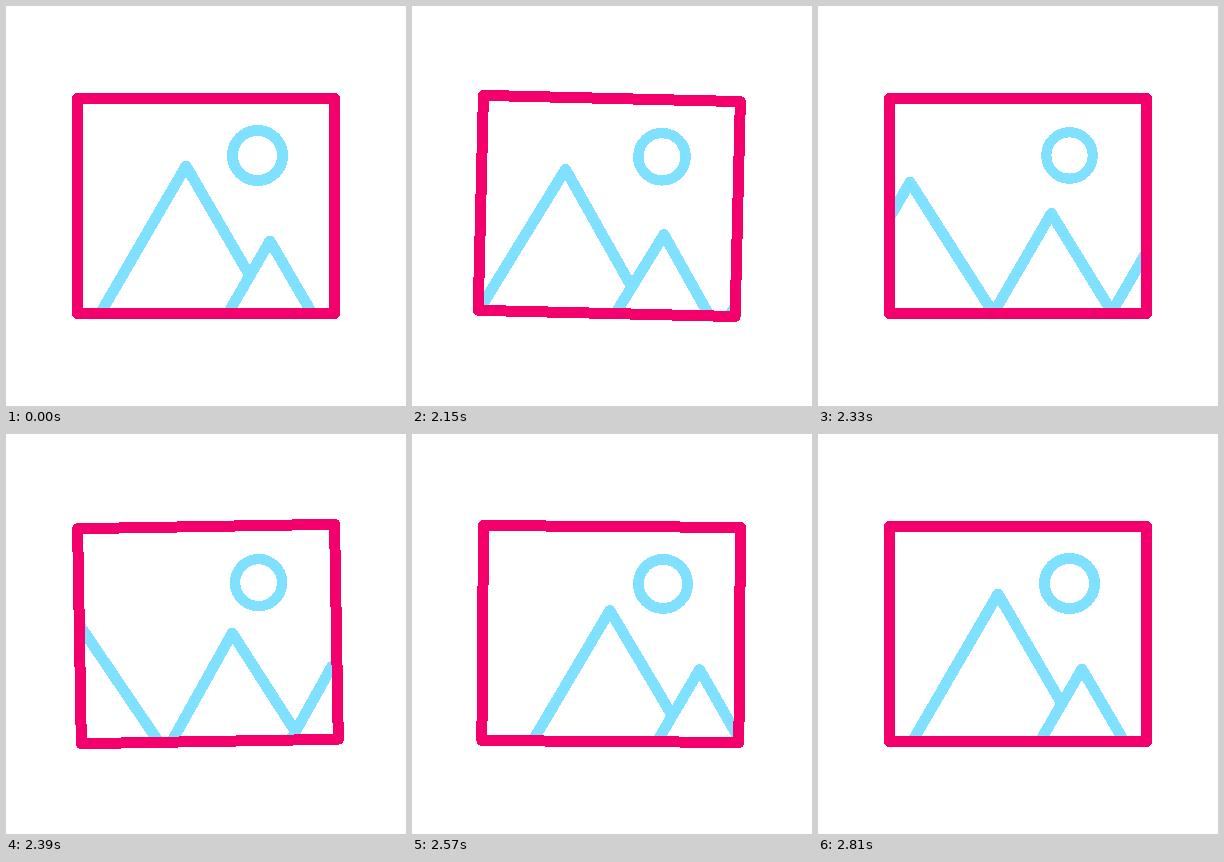
An HTML page for the animation above (2.9 s loop, 400 by 400 pixels).

```html
<!DOCTYPE html>
<html lang="en">
<head>
<meta charset="utf-8">
<title>Swinging picture</title>
<style>
  html, body { margin: 0; width: 100%; height: 100%; overflow: hidden; background: #fff; }
  svg { display: block; width: 100%; height: 100%; }
  svg * {
    fill: none; stroke-width: 11; stroke-linejoin: round;
    shape-rendering: crispEdges;
  }
  .blue { stroke: #80e0ff; }
  .pink { stroke: #f4006c; }
</style>
</head>
<body>
<svg viewBox="0 0 400 400">
  <clipPath id="inside"><rect x="71.5" y="92.5" width="257" height="215"/></clipPath>
  <g id="picture">
    <g clip-path="url(#inside)">
      <path id="peaks" class="blue"/>
      <circle id="sun" class="blue" r="25"/>
    </g>
    <rect class="pink" x="71.5" y="92.5" width="257" height="215"/>
  </g>
</svg>
<script>
const LOOP = 2900, START = 2000, STEP = 30, STEPS = 27;
const BASE = 320, SLOPE = 1.72;
// [step, degrees] of the swing around the top edge
const SWING = [[0, 0], [7.2, 1.8], [13.6, -1.1], [19.3, 0.45], [27, 0]];

const picture = document.getElementById('picture');
const peaks = document.getElementById('peaks');
const sun = document.getElementById('sun');

const mix = (a, b, p) => a + (b - a) * p;
const ease = x => mix((1 - Math.cos(Math.PI * x)) / 2, x, 0.2);

function swingAt(step) {
  const i = Math.max(1, SWING.findIndex(key => key[0] >= step));
  const [s0, a0] = SWING[i - 1], [s1, a1] = SWING[i];
  return mix(a0, a1, ease((step - s0) / (s1 - s0)));
}

// Each peak slides left: large leaves, small grows large, a new small one enters.
function peaksAt(p) {
  return [
    { x: mix(180, -60, p), y: mix(160, 204, p), slope: SLOPE - 0.4 * p },
    { x: mix(264, 180, p), y: mix(235, 160, p), slope: SLOPE - 0.1 * Math.sin(Math.PI * p) },
    { x: mix(376, 264, p), y: 235, slope: SLOPE }
  ];
}

// The right leg stops where it meets the left leg of the next peak.
function legs(peak, i, all) {
  const { x, y, slope } = peak, next = all[i + 1];
  let run = (BASE - y) / slope;
  if (next) run = Math.min(run, (next.y - y + SLOPE * (next.x - x)) / (slope + SLOPE));
  return `M${x - (BASE - y) / SLOPE} ${BASE}L${x} ${y}L${x + run} ${y + slope * run}`;
}

function draw(time) {
  const step = Math.min(STEPS, Math.max(0, Math.floor((time % LOOP - START) / STEP)));
  const t = step / STEPS;
  const pulse = Math.max(0, Math.sin(Math.PI * (1 - (1 - t) ** 1.7))) ** 1.5;
  picture.setAttribute('transform', `rotate(${swingAt(step)} 200 87)`);
  peaks.setAttribute('d', peaksAt(ease(t)).map(legs).join(''));
  sun.setAttribute('transform', `translate(251.5 149.5) scale(${1 - 0.075 * pulse})`);
}

function tick() {
  draw(performance.now());
  requestAnimationFrame(tick);
}
tick();
</script>
</body>
</html>
```
